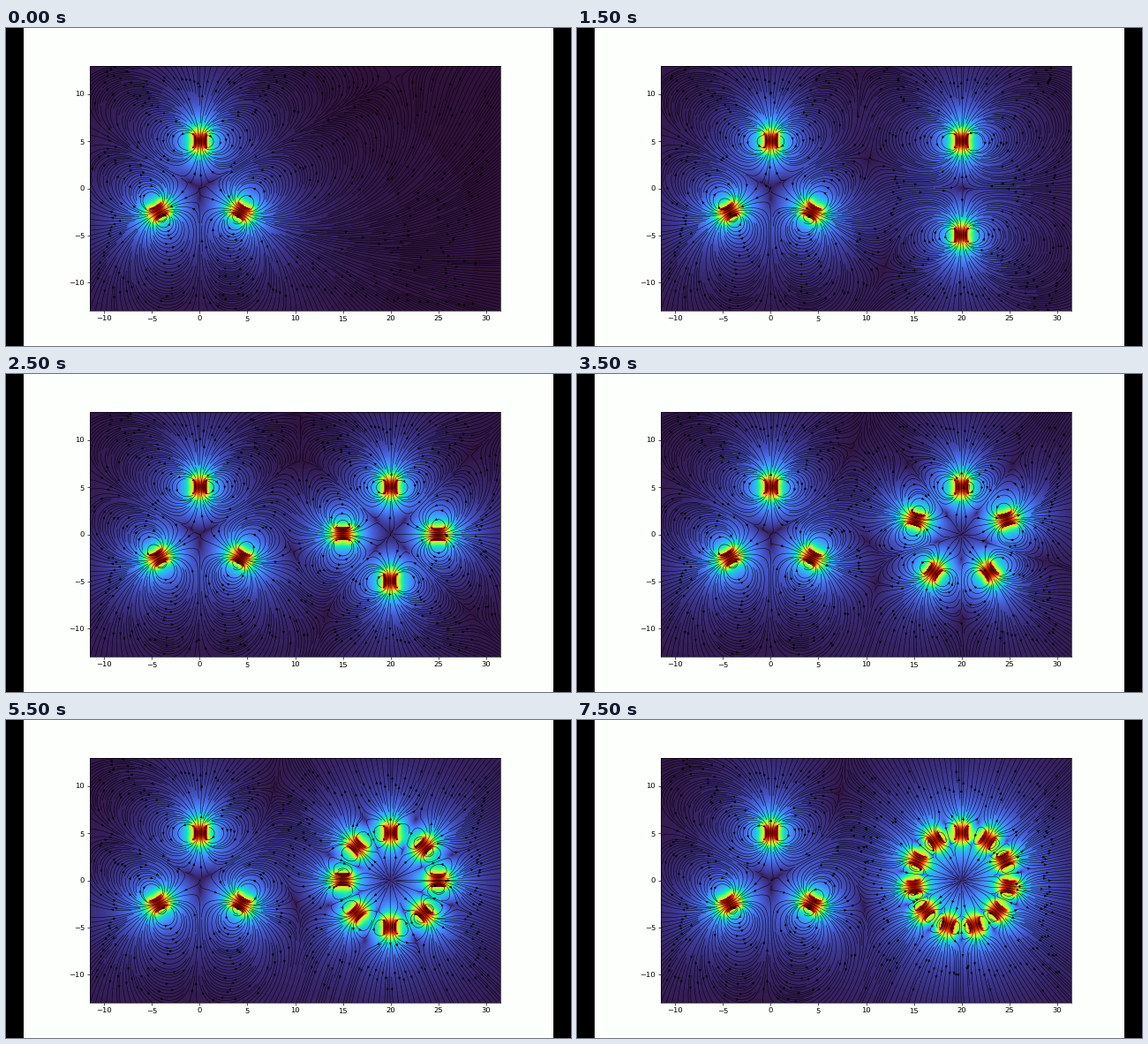
Write a matplotlib script that moves like this. It is 640 px wide and 360 px high and loops after 8000 ms.

```python
import math

import matplotlib.pyplot as plt
import numpy as np
from matplotlib.animation import FuncAnimation
from matplotlib.collections import LineCollection, PolyCollection
from matplotlib.patches import Rectangle

STAGE_W, STAGE_H, DPI = 640, 360, 60
BAR = 20                      # black side bars, px
AX_W, AX_H = 465, 277.2       # plot area, px

X0, X1, Y0, Y1 = -11.5, 31.5, -13, 13
W, H = X1 - X0, Y1 - Y0
STEP = 0.1
NX, NY = round(W / STEP), round(H / STEP)

RING = 5                      # ring radius
HALF = 0.7                    # half the side of a cube magnet
VMAX = 0.84

CELLS = 150                   # streamline mask resolution
MAX_STEP = 1 / CELLS
MAX_ERROR = 0.003
MIN_LENGTH, MAX_LENGTH = 0.1, 2

# Magnets in the right ring, one entry per half second
COUNTS = [0, 1, 1, 2, 3, 4, 4, 5, 6, 7, 7, 8, 9, 10, 10, 11]

plt.rcParams["text.hinting"] = "none"

gx, gy = np.meshgrid(np.linspace(X0, X1, NX + 1), np.linspace(Y0, Y1, NY + 1))
plane = gx + 1j * gy


def cube_field(x, y):
    """Mid-plane field of a unit cube magnet magnetised along x."""
    along, across = 0, 0
    for face in (1, -1):
        # tiny offset keeps grid points off the faces and corners
        dx = x - face * HALF + 1e-6
        for edge in (1, -1):
            dy = y + edge * HALF + 1e-6
            rho = np.hypot(dx, dy)
            r = np.hypot(rho, HALF)
            along = along + face * edge * np.arctan(HALF * dy / (dx * r))
            across = across - face * edge * np.arcsinh(HALF / rho)
    inside = (np.abs(x + 1e-6) < HALF) & (np.abs(y + 1e-6) < HALF)
    return (along + 1j * across) / (2 * math.pi) + inside


def ring_field(center, count):
    """Field of magnets on a ring, all magnetised radially."""
    total = np.zeros_like(plane)
    for k in range(count):
        angle = math.pi / 2 + 2 * math.pi * k / count
        turn = complex(math.cos(angle), math.sin(angle))
        local = (plane - center - RING * turn) / turn
        total += cube_field(local.real, local.imag) * turn
    return total


def spiral(n):
    """Mask cells from the border inwards, counterclockwise."""
    for lo in range(n // 2):
        hi = n - 1 - lo
        yield from ((i, lo) for i in range(lo, hi))
        yield from ((hi, j) for j in range(lo, hi))
        yield from ((i, hi) for i in range(hi, lo, -1))
        yield from ((lo, j) for j in range(hi, lo, -1))


def cell_of(p):
    return int(p.real * (CELLS - 1) + 0.5), int(p.imag * (CELLS - 1) + 0.5)


def clamp(p):
    return complex(min(max(p.real, 0), 1), min(max(p.imag, 0), 1))


def streamlines(field):
    """Evenly spaced field lines as lists of points in the unit square."""
    rows = (field.real / W + 1j * field.imag / H).tolist()
    taken = set()

    def direction(p):
        x, y = p.real * NX, p.imag * NY
        if not (0 <= x <= NX and 0 <= y <= NY):
            return None
        i, j = min(int(x), NX - 1), min(int(y), NY - 1)
        low, high = rows[j], rows[j + 1]
        a = low[i] + (low[i + 1] - low[i]) * (x - i)
        b = high[i] + (high[i + 1] - high[i]) * (x - i)
        v = a + (b - a) * (y - j)
        size = abs(v)
        return v / size if size else None

    def trace(p, sign, cells):
        points, length, ds = [p], 0, MAX_STEP
        current = cells[0]
        while length + ds <= MAX_LENGTH:
            d1 = direction(p)
            if d1 is None:
                break
            ahead = p + sign * ds * d1
            d2 = direction(ahead)
            if d2 is None:
                points.append(clamp(ahead))
                length += abs(points[-1] - p)
                break
            error = abs(d2 - d1) * ds / 2
            if error < MAX_ERROR:
                p = p + sign * ds * (d1 + d2) / 2
                if clamp(p) != p:
                    points.append(clamp(p))
                    break
                cell = cell_of(p)
                if cell != current:
                    if cell in taken:
                        break
                    taken.add(cell)
                    cells.append(cell)
                    current = cell
                points.append(p)
                length += ds
            if error:
                ds = min(MAX_STEP, 0.85 * ds * math.sqrt(MAX_ERROR / error))
            else:
                ds = MAX_STEP
        return points, length

    lines = []
    for cell in spiral(CELLS):
        if cell in taken:
            continue
        start = complex(*cell) / (CELLS - 1)
        cells = [cell]
        taken.add(cell)
        back, back_length = trace(start, -1, cells)
        forth, forth_length = trace(start, 1, cells)
        if back_length + forth_length > MIN_LENGTH:
            lines.append(np.array(back[:0:-1] + forth))
        else:
            taken.difference_update(cells)
    return lines


def to_data(p):
    return np.column_stack([X0 + W * p.real, Y0 + H * p.imag])


def arrow_head(line, length=2.6, half_width=1.2):
    """Triangle at the middle of a line, sized in pixels."""
    px = line.real * AX_W + 1j * line.imag * AX_H
    s = np.cumsum(np.abs(np.diff(px)))
    n = min(np.searchsorted(s, s[-1] / 2), len(px) - 2)
    heading = px[n + 1] - px[n]
    heading /= abs(heading) or 1
    tip = (px[n] + px[n + 1]) / 2
    tri = tip + heading * np.array([0, -length + 1j * half_width,
                                    -length - 1j * half_width])
    return to_data(tri.real / AX_W + 1j * tri.imag / AX_H)


def build_state(field):
    image = ax.imshow(np.sqrt(np.abs(field)), cmap="turbo", vmin=0, vmax=VMAX,
                      extent=(X0, X1, Y0, Y1), origin="lower", aspect="auto",
                      interpolation="bilinear")
    lines = streamlines(field)
    curves = LineCollection([to_data(p) for p in lines],
                            colors="black", linewidths=0.6)
    heads = PolyCollection([arrow_head(p) for p in lines],
                           facecolors="black", edgecolors="black",
                           linewidths=0.4)
    ax.add_collection(curves, autolim=False)
    ax.add_collection(heads, autolim=False)
    return image, curves, heads


fig = plt.figure(figsize=(STAGE_W / DPI, STAGE_H / DPI), dpi=DPI,
                 facecolor="#fdfffc")
for left in (0, STAGE_W - BAR):
    fig.add_artist(Rectangle((left / STAGE_W, 0), BAR / STAGE_W, 1,
                             facecolor="black", linewidth=0))
ax = fig.add_axes([95 / STAGE_W, 0.11, AX_W / STAGE_W, AX_H / STAGE_H])

left_ring = ring_field(0, 3)
states = {n: build_state(left_ring + ring_field(20, n))
          for n in sorted(set(COUNTS))}

ax.set_xlim(X0, X1)
ax.set_ylim(Y0, Y1)
ax.set_xticks(range(-10, 31, 5))
ax.set_yticks(range(-10, 11, 5))


def update(i):
    for n, artists in states.items():
        for artist in artists:
            artist.set_visible(n == COUNTS[i])
    return states[COUNTS[i]]


anim = FuncAnimation(fig, update, frames=len(COUNTS), interval=500,
                     init_func=lambda: update(0), repeat=True, repeat_delay=0)
plt.show()
```
